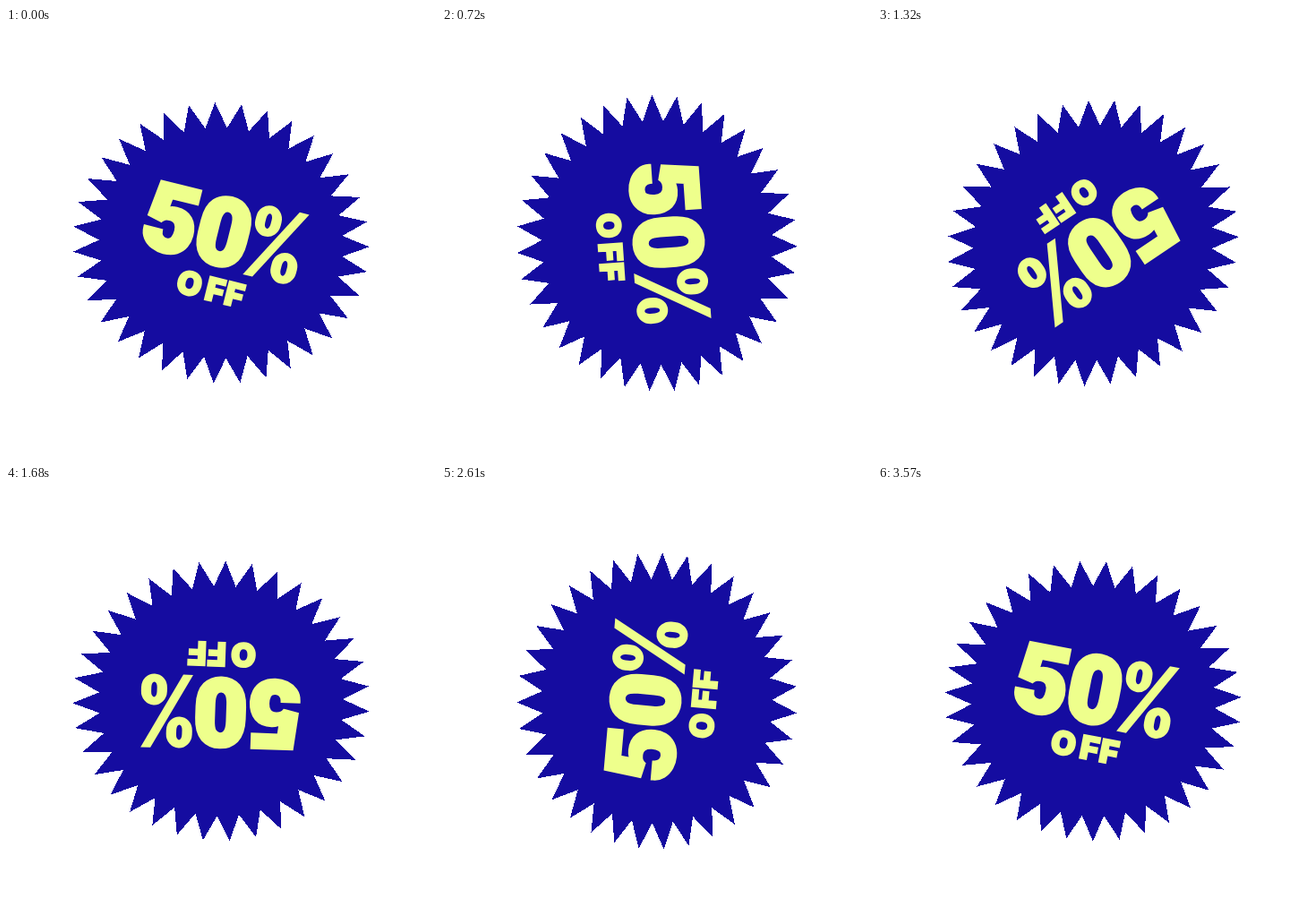
Recreate the animation shown at these times as an HTML page. Size 480 by 480 pixels, loop 3600 ms.

```html
<!DOCTYPE html>
<html lang="en">
<head>
<meta charset="utf-8">
<title>50% OFF</title>
<style>
  html, body { margin: 0; width: 100%; height: 100%; overflow: hidden; background: #fff; }
  svg { display: block; width: 100vw; height: 100vh; }
  #star { fill: #150ca0; shape-rendering: crispEdges; }
  text { fill: #eeff8c; stroke: #eeff8c; text-anchor: middle; font-weight: 900; }
  .value { font-family: Roboto, sans-serif; font-size: 104px; stroke-width: 5; }
  .label { font-family: Inter, sans-serif; font-size: 36px; stroke-width: 2; }
  .sign { fill: #eeff8c; }
  .hole { fill: #150ca0; }
</style>
</head>
<body>
<svg viewBox="0 0 480 480" role="img" aria-label="50% OFF">
  <defs>
    <g id="ring">
      <rect class="sign" x="-14.5" y="-17.5" width="29" height="35" rx="14.5" ry="15.5"/>
      <rect class="hole" x="-3.2" y="-8.5" width="6.4" height="17" rx="3.2" ry="6"/>
    </g>
  </defs>
  <g id="badge">
    <path id="star"/>
    <g transform="rotate(2.8)">
      <text class="value" x="-60 0" y="24">50</text>
      <use href="#ring" x="45.5" y="-36.5"/>
      <use href="#ring" x="75" y="10.5"/>
      <path class="sign" d="M32 28H43L88 -54.5H77Z"/>
      <text class="label" x="-23.2 6.5 28.5" y="65.3">OFF</text>
    </g>
  </g>
</svg>
<script>
  const LOOP = 3600, STEP = 30;
  const CENTER = 240, START = 11.2;
  const TIPS = 35, RX = 166, RY = 156.5, INNER = 0.82;

  const badge = document.getElementById('badge');

  // Oval starburst: tips and valleys alternate around an ellipse.
  function starPath() {
    const points = [];
    for (let i = 0; i < TIPS * 2; i++) {
      const a = i * Math.PI / TIPS;
      const k = i % 2 ? INNER : 1;
      points.push((RX * k * Math.cos(a)).toFixed(2) + ' ' + (RY * k * Math.sin(a)).toFixed(2));
    }
    return 'M' + points.join('L') + 'Z';
  }

  // One clockwise turn per loop, advancing in even steps.
  function draw(ms) {
    const t = Math.floor((ms % LOOP) / STEP) * STEP;
    const angle = START + 360 * t / LOOP;
    badge.setAttribute('transform', `translate(${CENTER} ${CENTER}) rotate(${angle})`);
  }

  document.getElementById('star').setAttribute('d', starPath());
  draw(0);

  let start = null;
  function tick(now) {
    if (start === null) start = now;
    draw(now - start);
    requestAnimationFrame(tick);
  }
  requestAnimationFrame(tick);
</script>
</body>
</html>
```
